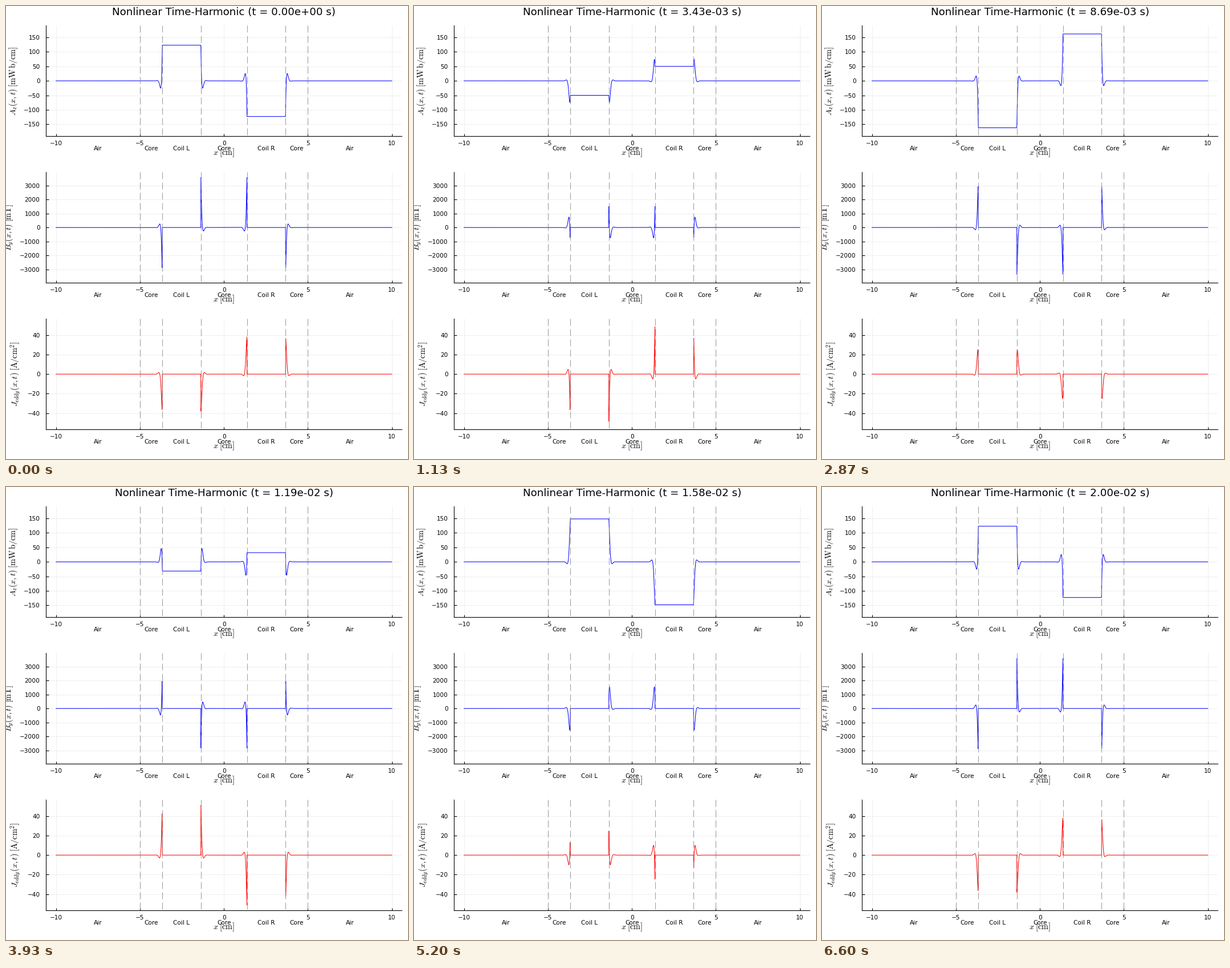
Recreate the animation shown at these times as a matplotlib script. Size 705 by 794 pixels, loop 6670 ms.

```python
import numpy as np
import matplotlib.pyplot as plt
from matplotlib.animation import FuncAnimation

W, H, DPI = 705, 794, 64
PT = 72 / DPI  # points per pixel

# The loop shows 100 poses; short ticks let each pose start on time.
POSES, POSE_MS, PERIOD = 100, 66.7, 0.02
TICKS, TICK_MS = 230, 29

plt.rcParams.update({
    "font.family": "DejaVu Sans",
    "mathtext.fontset": "cm",
    "lines.scale_dashes": False,
})

LEFT, RIGHT, HEIGHT = 70.05, 694.3, 194
X_LIM = 10.6
INNER, OUTER, EDGE = 1.375, 3.6667, 5.0
SKIN = 0.0655          # skin depth in cm
PHASE = np.radians(44.9)
SMALL, MATH, TITLE = 10.46, 14.3, 18.3

fig = plt.figure(figsize=(W / DPI, H / DPI), dpi=DPI, facecolor="white")


def label(x, y, text, size, **kw):
    """Text with its baseline at pixel (x, y), measured from the top left."""
    kw = {"ha": "center", "va": "baseline", **kw}
    return fig.text(x / W, 1 - y / H, text, fontsize=size * PT, color="black", **kw)


def x_px(x):
    return (LEFT + RIGHT) / 2 + x * (RIGHT - LEFT) / (2 * X_LIM)


def number(v):
    return str(v).replace("-", "\u2212")


def panel(top, limit, ticks, name, name_x, color):
    bottom, mid = top + HEIGHT, top + HEIGHT / 2
    ax = fig.add_axes([LEFT / W, 1 - bottom / H, (RIGHT - LEFT) / W, HEIGHT / H])
    ax.set(xlim=(-X_LIM, X_LIM), ylim=(-limit, limit),
           xticks=range(-10, 11, 5), yticks=ticks)
    ax.set_axisbelow(True)
    ax.grid(color="black", alpha=0.1, lw=0.6 * PT)
    ax.tick_params(direction="in", length=4.5 * PT, width=1.1 * PT,
                   labelbottom=False, labelleft=False)
    ax.spines[["top", "right"]].set_visible(False)
    ax.spines[["left", "bottom"]].set_linewidth(1.1 * PT)

    for v in range(-10, 11, 5):
        label(x_px(v), bottom + 16, number(v), SMALL)
    for v in ticks:
        label(59.6, mid - v / limit * HEIGHT / 2 + 4, number(v), SMALL, ha="right")

    walls = [-EDGE, -OUTER, -INNER, INNER, OUTER, EDGE]
    ends = [-10, *walls, 10]
    regions = ["Air", "Core", "Coil L", "Core", "Coil R", "Core", "Air"]
    for a, b, region in zip(ends, ends[1:], regions):
        label(x_px((a + b) / 2), bottom + 24.8, region, SMALL)
    label(382, bottom + 32.8, r"$x\;[\mathrm{cm}]$", MATH)
    label(name_x, mid, name, MATH, rotation=90, rotation_mode="anchor")

    line, = ax.plot([], [], color=color, lw=PT, zorder=3)
    for x in walls:
        ax.plot([x, x], [limit, -limit], color="gray", alpha=0.75, lw=1.1 * PT,
                ls=(0, (12 * PT, 6 * PT)), dash_capstyle="butt", zorder=4)
    return line


def mesh():
    """Nodes from left to right: position, depth, winding sign, side, coil flag."""
    faces = [(-OUTER, -1, 1, 0.24), (-INNER, 1, 1, 0.05),
             (INNER, -1, -1, 0.05), (OUTER, 1, -1, 0.24)]
    parts = [[[-10], [40], [1], [-1], [1]]]
    for pos, side, sign, first in faces:
        u = np.r_[0, first + 0.28 * np.arange(45)]
        one = np.ones_like(u)
        block = np.array([pos + side * SKIN * u, u, sign * one, side * one, u == 0])
        parts.append(block[:, ::side])
    parts.append([[10], [40], [-1], [1], [1]])
    return np.hstack(parts)


X, U, SIGN, SIDE, COIL = mesh()
DECAY = SIGN * np.exp(-U)
CORE = DECAY * (COIL == 0)

a_line = panel(34.2, 191, range(-150, 151, 50),
               r"$A_z(x,t)\;[\mathrm{mW\,b/cm}]$", 16.8, "blue")
b_line = panel(291.2, 3967, range(-3000, 3001, 1000),
               r"$B_y(x,t)\;[\mathrm{mT}]$", 9.3, "blue")
j_line = panel(548.2, 56.6, range(-40, 41, 20),
               r"$J_{eddy}(x,t)\;[\mathrm{A/cm^2}]$", 20.8, "red")
title = label(382.3, 16, "", TITLE)


def update(tick):
    pose = min(int((tick * TICK_MS + POSE_MS / 2) / POSE_MS), POSES - 1)
    turn = pose / (POSES - 1)
    angle = 2 * np.pi * turn + PHASE + U
    a_line.set_data(X, 173.7 * DECAY * np.cos(angle))
    b_line.set_data(X, 3775 * SIDE * CORE * np.cos(angle - np.radians(44.3)))
    j_line.set_data(X, -54 * CORE * np.sin(angle))
    title.set_text(f"Nonlinear Time-Harmonic (t = {turn * PERIOD:.2e} s)")
    return a_line, b_line, j_line, title


anim = FuncAnimation(fig, update, frames=TICKS, interval=TICK_MS, repeat=True)
plt.show()
```
